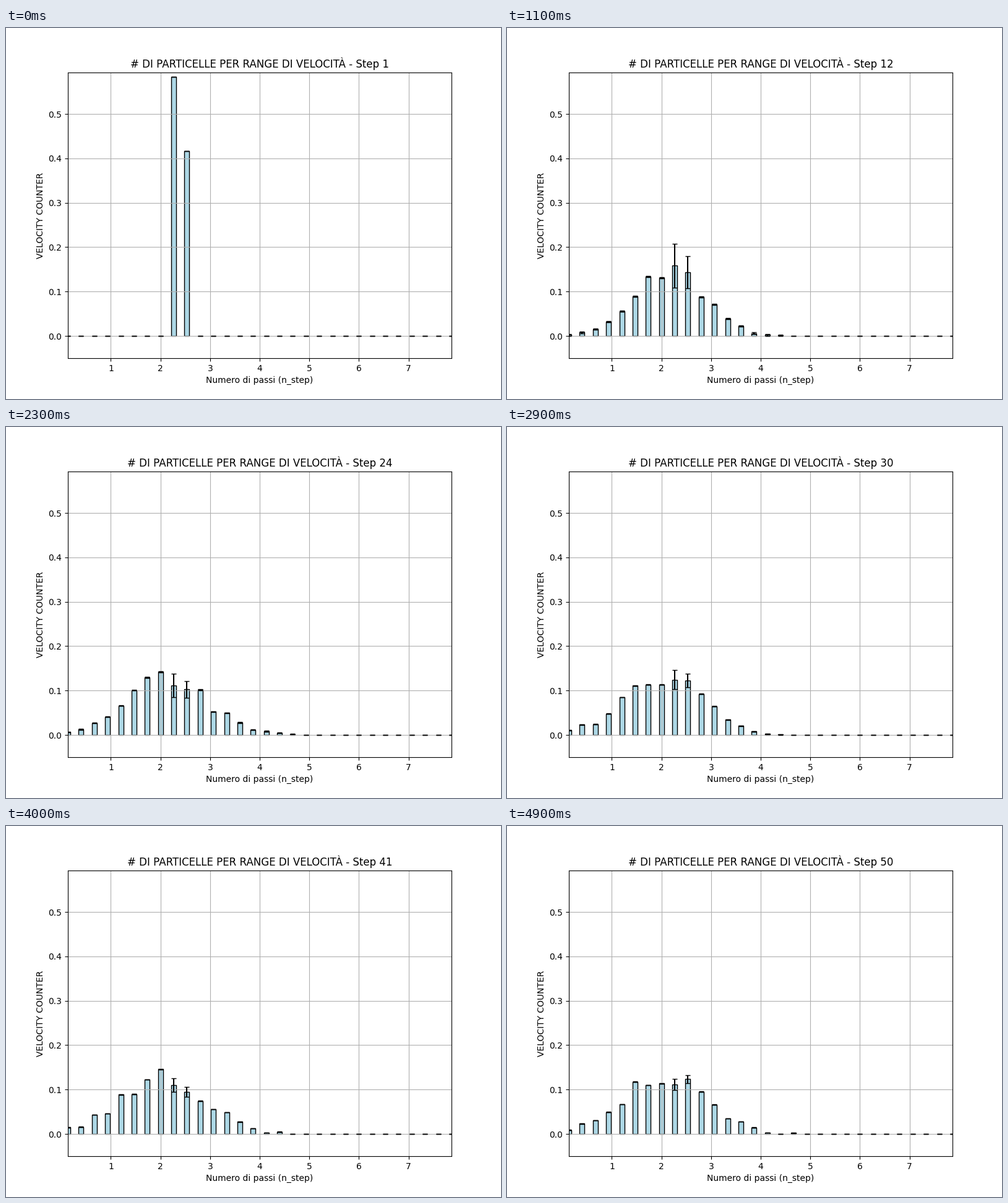
A matplotlib script that plays this animation: 800x600 px, repeating every 5000 ms.

```python
import numpy as np
import matplotlib.pyplot as plt
from matplotlib.animation import FuncAnimation

STEPS = 50
BINS = 30
V_MAX = 8
START_SPEED, FINAL_SPEED = 2.39192, 2.03
START_SPREAD, FINAL_SPREAD = 0.08, 0.85

speeds = (np.arange(BINS) + 0.5) * V_MAX / BINS
rng = np.random.default_rng(11)
phase = rng.uniform(0, 2 * np.pi, BINS)
rate = rng.uniform(0.2, 0.8, BINS)


def relaxed(step, time):
    """Progress towards equilibrium: 0 at the first step, then close to 1."""
    return 1 - np.exp(-(step - 1) / time)


def shares(step):
    """Share of particles per bin: a bell that widens and slows, with fluctuations."""
    center = START_SPEED + (FINAL_SPEED - START_SPEED) * relaxed(step, 12)
    spread = START_SPREAD + (FINAL_SPREAD - START_SPREAD) * relaxed(step, 7)
    h = np.exp(-((speeds - center) / spread) ** 2 / 2)
    h /= h.sum()
    h += 0.045 * relaxed(step, 7) * np.sqrt(h) * np.sin(phase + rate * step)
    h[h < 0.0012] = 0
    return h / h.sum()


start_shares = shares(1)


def errors(step):
    """The initial peak dominates the error, which falls off as 1 / step."""
    return (0.02 + 1.06 * start_shares) * relaxed(step, 4) / step


fig, ax = plt.subplots(figsize=(8, 6), dpi=100)


def update(frame):
    step = frame + 1
    h = shares(step)
    ax.clear()
    ax.bar(speeds, h, width=0.1, yerr=np.where(h > 0, errors(step), 0), capsize=3,
           color="lightblue", edgecolor="black")
    ax.set_xlim(speeds[0], speeds[-1])
    ax.set_ylim(-0.05, start_shares.max() + 0.01)
    ax.set_xlabel("Numero di passi (n_step)")
    ax.set_ylabel("VELOCITY COUNTER")
    ax.set_title(f"# DI PARTICELLE PER RANGE DI VELOCITÀ - Step {step}")
    ax.grid(True)
    return ax.patches


anim = FuncAnimation(fig, update, frames=STEPS, interval=100,
                     init_func=lambda: update(0), repeat=True, repeat_delay=0)
plt.show()
```
